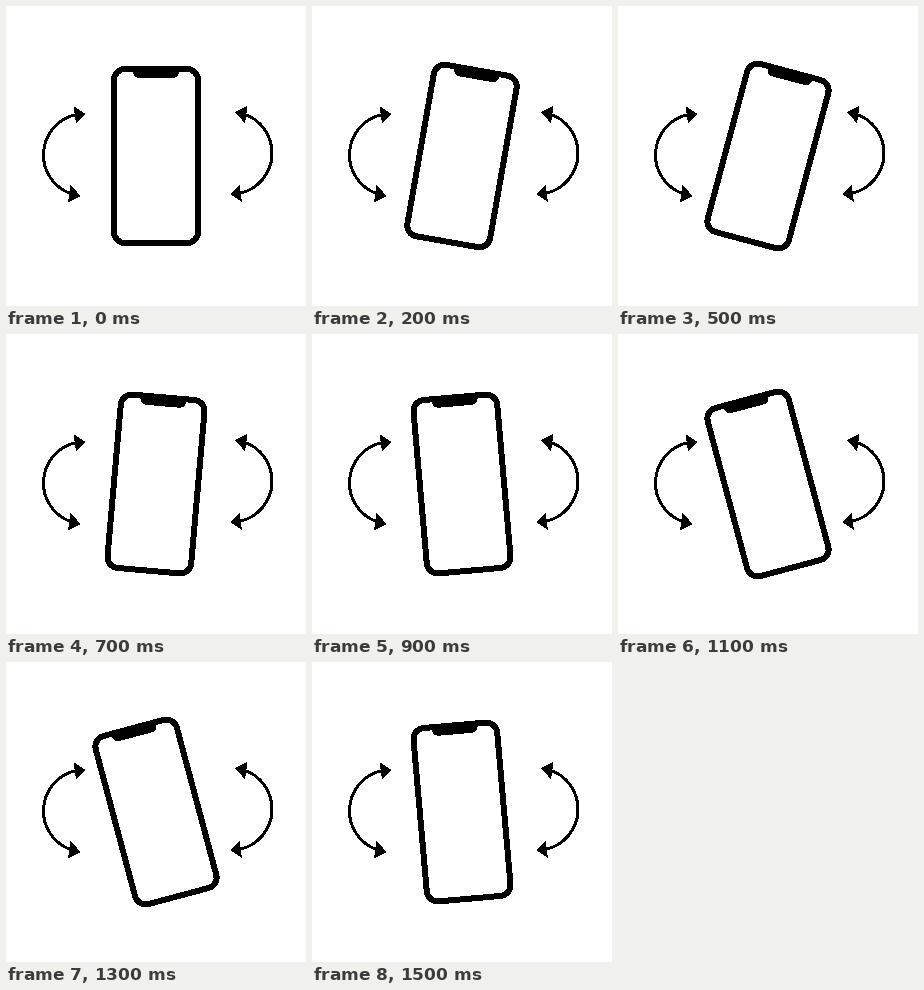
These frames come from a looping animation (300 by 300 pixels, 1.6 s). An HTML page:

```html
<!DOCTYPE html>
<html lang="en">
<head>
<meta charset="utf-8">
<title>Rotate phone</title>
<style>
  html, body { margin: 0; width: 100%; height: 100%; overflow: hidden; background: #fff; }
  svg { display: block; width: 100vw; height: 100vh; }
</style>
</head>
<body>
<svg viewBox="0 0 300 300" shape-rendering="crispEdges">
  <defs>
    <g id="arrow">
      <path d="M71 108.4A41.2 41.2 0 0 0 67 188.4" fill="none" stroke="#000" stroke-width="3"/>
      <path d="M79.5 108L67.5 100L70 117.5ZM74.5 190L64.5 178.5L62 196.5Z"/>
    </g>
  </defs>
  <use href="#arrow"/>
  <use href="#arrow" transform="rotate(180 151.75 148)"/>
  <g id="phone">
    <rect x="108" y="63" width="84" height="174" rx="11" fill="#fff" stroke="#000" stroke-width="6"/>
    <path d="M127 64H173V66Q172 72 166 72H134Q128 72 127 66Z"/>
  </g>
</svg>
<script>
  const phone = document.getElementById('phone');
  const STEP_MS = 100, STEPS = 16, DEGREES = 5;

  // Triangle wave: 0, 20, 0, -20 degrees, in steps of 5.
  function angleAt(ms) {
    const step = Math.floor(ms / STEP_MS) % STEPS;
    return DEGREES * (4 - Math.abs((step + 4) % STEPS - 8));
  }

  function draw() {
    phone.setAttribute('transform', `rotate(${angleAt(performance.now())} 150 150)`);
    requestAnimationFrame(draw);
  }
  draw();
</script>
</body>
</html>
```
